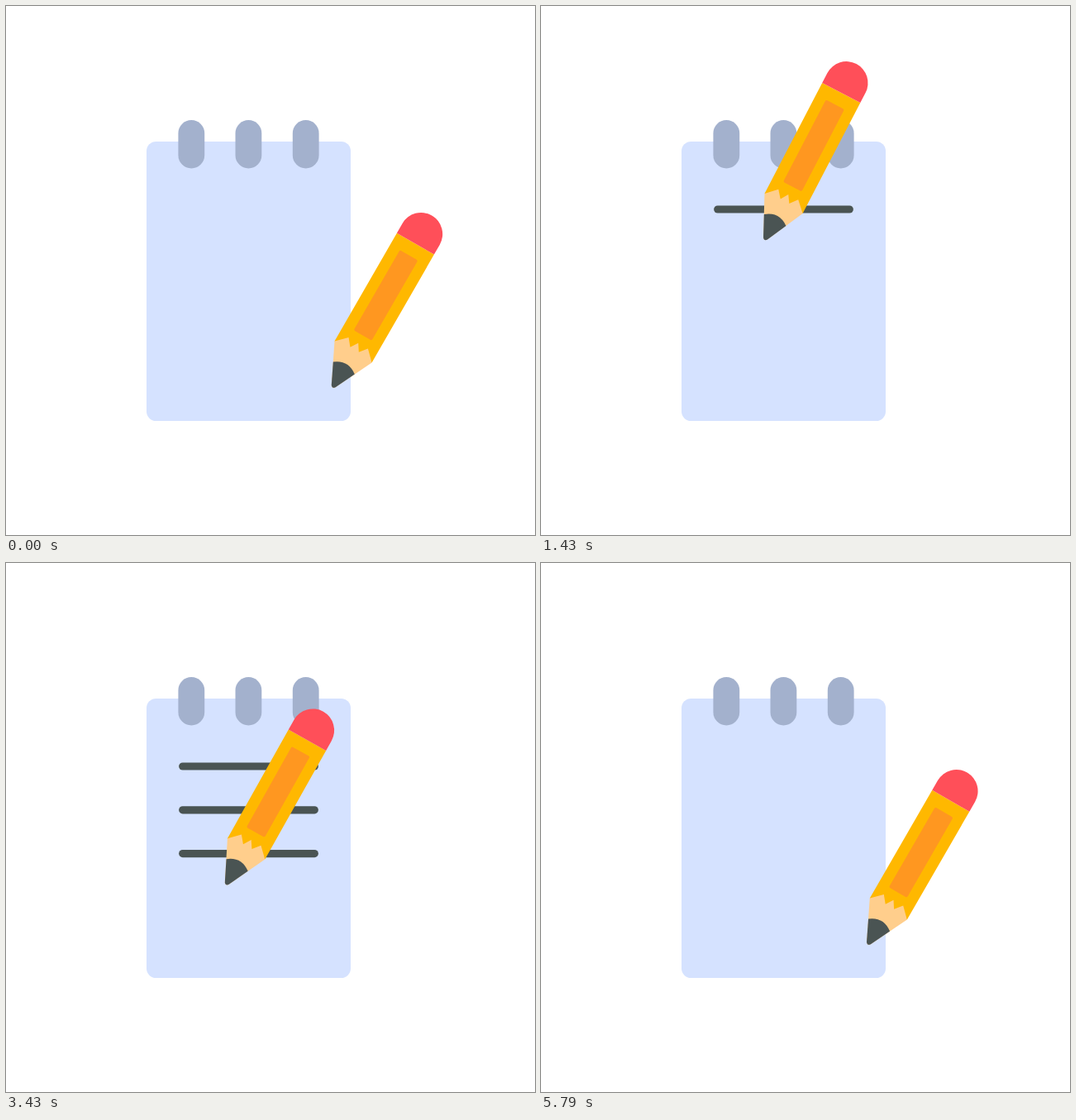
Recreate the animation shown at these times as an HTML page. Size 640x640 px, loop 6.43 s.

```html
<!DOCTYPE html>
<html lang="en">
<head>
<meta charset="utf-8">
<title>Notepad and pencil</title>
<style>
  html, body { margin: 0; width: 100%; height: 100%; overflow: hidden; background: #fff; }
  svg { display: block; width: 100%; height: 100%; }
</style>
</head>
<body>
<svg viewBox="0 0 640 640">
  <rect x="170" y="164" width="247" height="338" rx="11.5" fill="#d5e2ff"/>
  <g fill="#a3b1cd">
    <rect x="208.4" y="138" width="31.8" height="58.4" rx="15.9"/>
    <rect x="277.5" y="138" width="31.8" height="58.4" rx="15.9"/>
    <rect x="346.8" y="138" width="31.8" height="58.4" rx="15.9"/>
  </g>
  <g id="lines" stroke="#4a5453" stroke-width="9.2" stroke-linecap="round"></g>
  <!-- the pencil points down, its tip at 0,0 -->
  <g id="pencil">
    <path fill="#ffce8c" d="M-26-50L-22-66H22L26-50L2.8-2.3Q0 1.5-2.8-2.3Z"/>
    <path fill="#ffb800" d="M-26-201H26V-50L13.5-62.4L6-53.2L0-62.4L-6-53.2L-13.5-62.4L-26-50Z"/>
    <rect x="-12.6" y="-185" width="25.2" height="112" rx="2" fill="#ff9720"/>
    <path fill="#ff4f59" d="M-26-201V-214.5A26 26 0 0 1 26-214.5V-201Z"/>
    <path fill="#4a5453" d="M-15-27.5Q0-39 15-27.5L2.8-2.3Q0 1.5-2.8-2.3Z"/>
  </g>
</svg>
<script>
const LOOP = 6430, LEFT = 213.7, RIGHT = 373.3;
const REST = { x: 395.3, y: 461.8, a: 30 };

// Pencil pose where each written line begins and ends
const starts = [
  { x: 212, y: 246.5, a: 21 },
  { x: 213.5, y: 299, a: 28.5 },
  { x: 213.5, y: 352, a: 30 },
  { x: 213.5, y: 405, a: 30 },
  { x: 213.5, y: 458, a: 30 }
];
const ends = [
  { x: 373, y: 246.5, a: 11 },
  { x: 364, y: 300, a: 16.5 },
  { x: 361, y: 353, a: 17.5 },
  { x: 371, y: 405, a: 15.2 },
  { x: 368, y: 458, a: 16.5 }
];

const writeFrom = i => i ? 605 + 1000 * i : 650;
const writeTo = i => 1200 + 1000 * i;

// Smooth step over a time span; the power moves its middle
function ease(t, from, to, power = 1) {
  const u = Math.min(1, Math.max(0, (t - from) / (to - from))) ** power;
  return u * u * (3 - 2 * u);
}
const mix = (a, b, k) => a + (b - a) * k;
const blend = (p, q, kx, ky = kx, ka = kx) =>
  ({ x: mix(p.x, q.x, kx), y: mix(p.y, q.y, ky), a: mix(p.a, q.a, ka) });

const written = (t, i) => ease(t, writeFrom(i), writeTo(i), 1.13);

function pose(t) {
  if (t < writeFrom(0)) {
    const to = writeFrom(0);
    return blend(REST, starts[0], ease(t, 0, to, .6), ease(t, 0, to, .86), ease(t, 0, to, .48));
  }
  for (let i = 0; i < 5; i++) {
    const end = writeTo(i);
    if (t < end) return blend(starts[i], ends[i], written(t, i));
    if (i < 4 && t < writeFrom(i + 1)) {
      const next = writeFrom(i + 1);
      return blend(ends[i], starts[i + 1],
        ease(t, end, next, .92), ease(t, end, next, .8), ease(t, end, end + 270));
    }
  }
  return blend(ends[4], REST, ease(t, writeTo(4), 5770, 1.56));
}

const group = document.getElementById('lines');
const pencil = document.getElementById('pencil');
const lines = starts.map((s, i) => {
  const el = document.createElementNS('http://www.w3.org/2000/svg', 'line');
  const y = 246 + 52.8 * i;
  el.setAttribute('y1', y);
  el.setAttribute('y2', y);
  return group.appendChild(el);
});

function draw(t) {
  const erased = ease(t, 5429, 5784);
  lines.forEach((el, i) => {
    const k = written(t, i);
    el.setAttribute('visibility', k > 0 && erased < 1 ? 'visible' : 'hidden');
    el.setAttribute('x1', mix(LEFT, RIGHT, erased));
    el.setAttribute('x2', mix(LEFT, RIGHT, k));
  });
  const p = pose(t);
  pencil.setAttribute('transform', `translate(${p.x} ${p.y}) rotate(${p.a})`);
}

const begin = performance.now();
function tick() {
  draw((performance.now() - begin) % LOOP);
  requestAnimationFrame(tick);
}
tick();
</script>
</body>
</html>
```
